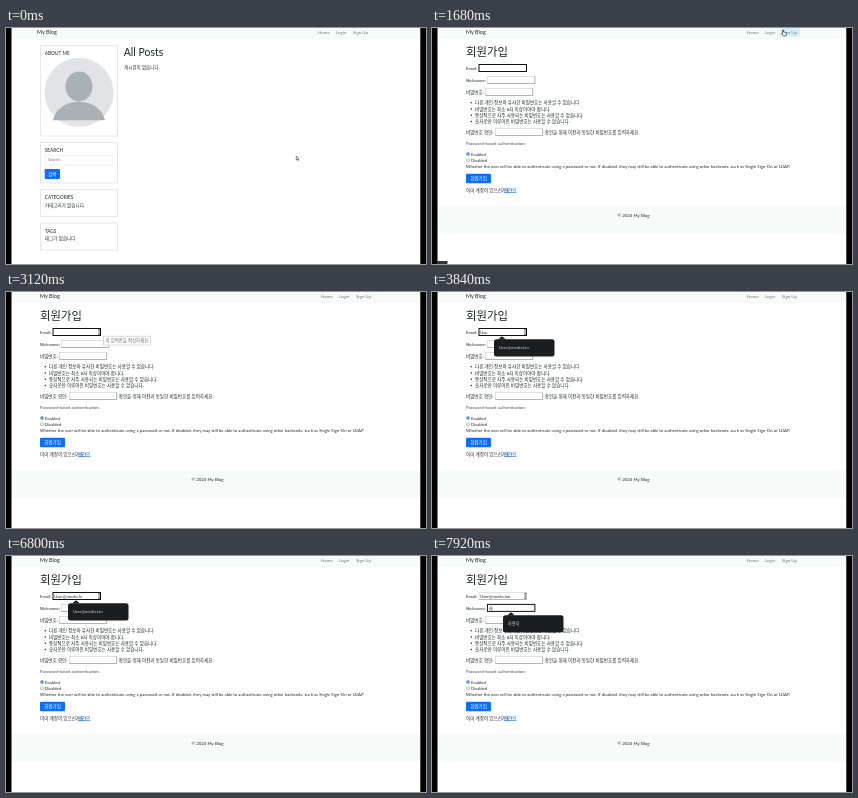
Recreate the animation shown at these times as an HTML page with a canvas. Size 420 by 236 pixels, loop 8000 ms.

```html
<!DOCTYPE html>
<html>
<head>
<meta charset="utf-8">
<title>Blog sign-up</title>
<style>
  html, body { margin: 0; width: 100%; height: 100%; overflow: hidden; background: #fff; }
  canvas { display: block; width: 420px; height: 236px; }
</style>
</head>
<body>
<canvas id="stage" width="420" height="236"></canvas>
<script>
const ctx = document.getElementById('stage').getContext('2d');
const LOOP = 8000;
const INK = '#212529', BLUE = '#0d6efd', BAR = '#f7faf9';
const KO = 4.55, EN = 4.25;
const EMAIL = 'User@media.lan';
const KEY_TIMES = [3360, 3600, 3840, 4000, 5200, 5440, 5760, 5920, 6080, 6320, 6560, 6720, 6800, 6960];

function rect(x, y, w, h, color) {
  ctx.fillStyle = color;
  ctx.fillRect(x, y, w, h);
}

function frame(x, y, w, h, color, width = 0.6) {
  ctx.strokeStyle = color;
  ctx.lineWidth = width;
  ctx.strokeRect(x, y, w, h);
}

function rounded(x, y, w, h, r, color) {
  ctx.fillStyle = color;
  ctx.beginPath();
  ctx.roundRect(x, y, w, h, r);
  ctx.fill();
}

function ellipse(x, y, rx, ry, color) {
  ctx.fillStyle = color;
  ctx.beginPath();
  ctx.ellipse(x, y, rx, ry, 0, 0, 7);
  ctx.fill();
}

// Laid out at ten times the size so that small glyphs keep exact spacing.
function text(str, x, y, size = KO, color = INK, align = 'left') {
  ctx.save();
  ctx.translate(x, y);
  ctx.scale(0.1, 0.1);
  ctx.font = `${size * 10}px Lato, "Noto Sans CJK KR", "Noto Sans CJK", sans-serif`;
  ctx.textAlign = align;
  ctx.fillStyle = color;
  ctx.fillText(str, 0, 0);
  ctx.restore();
}

function shape(points, x, y, fill, stroke) {
  ctx.beginPath();
  points.forEach(([px, py]) => ctx.lineTo(x + px, y + py));
  ctx.closePath();
  ctx.fillStyle = fill;
  ctx.fill();
  if (!stroke) return;
  ctx.strokeStyle = stroke;
  ctx.lineWidth = 0.6;
  ctx.stroke();
}

const arrow = (x, y) =>
  shape([[0, 0], [0, 4], [1, 3.2], [1.7, 4.6], [2.3, 4.3], [1.7, 3], [2.9, 2.9]], x, y, '#fff', '#333');

const hand = (x, y) =>
  shape([[0, 0], [1, 0], [1.1, 2], [3.9, 2.6], [3.7, 4.6], [3, 6], [1, 6], [-1, 3.5], [-0.4, 3], [0, 3.4]], x, y, '#fff', '#222');

function beam(x, y) {
  rect(x - 0.3, y - 2.5, 0.7, 5, '#333');
  rect(x - 1, y - 2.7, 2, 0.5, '#333');
  rect(x - 1, y + 2.2, 2, 0.5, '#333');
}

function nav(shift, hovered) {
  rect(5, 0, 410, 11, BAR);
  if (hovered) rounded(345 + shift, -1, 20, 10, 1, '#d9ecf8');
  text('My Blog', 31 + shift, 5.9, 5.4);
  text('Home', 312 + shift, 5.5, 4.4, '#70757a');
  text('Login', 330 + shift, 5.5, 4.4, '#70757a');
  text('Sign Up', 347 + shift, 5.5, 4.4, hovered ? '#4b8fc4' : '#70757a');
}

function card(y, h, title) {
  frame(34.5, y + 0.5, 77, h, '#dfe1e3', 0.8);
  text(title, 38.7, y + 10, 4.8);
}

function homePage(hovered) {
  nav(0, hovered);
  text('All Posts', 117.7, 28.2, 10.5);
  text('게시글이 없습니다.', 118, 40.8);

  card(17, 90.5, 'ABOUT ME');
  ellipse(73, 64.3, 34.5, 34.5, '#e1e3e6');
  ellipse(73, 58.5, 13.5, 15, '#abb0b4');
  ctx.beginPath();
  ctx.moveTo(47, 92.3);
  ctx.bezierCurveTo(52, 67.5, 94, 67.5, 99, 92.3);
  ctx.fill();

  card(114, 40.5, 'SEARCH');
  frame(39, 127.3, 68, 9.6, '#e3e6e8', 0.6);
  text('Search...', 42, 133.2, 4, '#777');
  rounded(38.7, 141, 15.3, 10, 1.2, BLUE);
  text('검색', 46.3, 147.5, 4.4, '#fff', 'center');

  card(161, 27, 'CATEGORIES');
  text('카테고리가 없습니다.', 39, 178.6);
  card(194.5, 27, 'TAGS');
  text('태그가 없습니다.', 39, 212.4);
}

function input(x, y, focused) {
  if (focused) {
    frame(x, y, 47.5, 7, '#111', 1);
  } else {
    frame(x, y, 47.5, 7, '#c4c4c4', 0.5);
    rect(x, y + 6.8, 47.5, 0.5, '#8a8a8a');
    rect(x + 47.3, y, 0.5, 7.2, '#8a8a8a');
  }
}

function radio(y, label, checked) {
  ellipse(36, y, 1.7, 1.7, checked ? BLUE : '#777');
  ellipse(36, y, 1.25, 1.25, '#fff');
  if (checked) ellipse(36, y, 0.95, 0.95, BLUE);
  text(label, 39, y + 1.5, EN);
}

function suggestion(x, y, label) {
  shape([[0, 3.2], [4, 0], [8, 3.2]], x + 4, y - 3, '#1c1d1e');
  rounded(x, y, 60.5, 17.2, 2.5, '#1c1d1e');
  text(label, x + 4.8, y + 10, EN, '#d2d4d6');
}

function formPage(t) {
  const onNickname = t >= 7120;
  nav(3, t < 1840);
  text('회원가입', 34, 27.8, 11.4);

  text('Email:', 34, 41.6, EN);
  input(47, 36.5, !onNickname);
  text(EMAIL.slice(0, KEY_TIMES.filter(k => t >= k).length), 48.2, 41.5, EN);

  text('Nickname:', 34, 53.5, EN);
  input(55.4, 48.4, onNickname);
  if (t >= 7760) text(t < 7840 ? 'ㅅ' : '사', 56.8, 53.5, KO);

  text('비밀번호:', 34, 65.6);
  input(53.3, 60.5);
  [
    '다른 개인 정보와 유사한 비밀번호는 사용할 수 없습니다.',
    '비밀번호는 최소 8자 이상이어야 합니다.',
    '통상적으로 자주 사용되는 비밀번호는 사용할 수 없습니다.',
    '숫자로만 이루어진 비밀번호는 사용할 수 없습니다.'
  ].forEach((rule, i) => {
    const y = 76.3 + i * 6.25;
    ellipse(39.3, y - 1.5, 0.75, 0.75, INK);
    text(rule, 43, y);
  });

  text('비밀번호 확인:', 34, 105.8);
  input(63.3, 100.5);
  text('확인을 위해 이전과 동일한 비밀번호를 입력하세요.', 112.7, 105.8);

  text('Password-based authentication:', 34, 117, EN, '#44484c');
  radio(126, 'Enabled', true);
  radio(132.2, 'Disabled', false);
  text('Whether the user will be able to authenticate using a password or not. If disabled, they may still be able to authenticate using other backends, such as Single Sign-On or LDAP.', 34, 140, EN);

  rounded(34, 145.7, 25, 9.5, 1.2, BLUE);
  text('회원가입', 46.5, 152.1, KO, '#fff', 'center');
  text('이미 계정이 있으신가요?', 34, 164);
  text('로그인', 72, 164, KO, BLUE);
  rect(72, 164.5, 12.6, 0.45, BLUE);

  rect(5, 178, 410, 28.3, BAR);
  text('© 2024 My Blog', 201.5, 188.8, 4.4, INK, 'center');

  if (t >= 3120 && t < 3200) {
    rect(97.5, 44.2, 47, 8.8, '#fff');
    frame(97.5, 44.2, 47, 8.8, '#c5c5c5', 0.6);
    text('이 입력란을 작성하세요.', 99.5, 50.1, 4.4, '#666');
  }
  if (t >= 3440 && t < 7040) suggestion(62, 47.2, EMAIL);
  if (t >= 7840) suggestion(71, 59.2, '사용자');
}

// Eased position between two points over a span of time.
function travel(t, start, end, [x0, y0], [x1, y1]) {
  const p = Math.min(1, Math.max(0, (t - start) / (end - start)));
  const e = p * p * (3 - 2 * p);
  return [x0 + (x1 - x0) * e, y0 + (y1 - y0) * e];
}

function pointer(t) {
  if (t < 1120) arrow(...travel(t, 680, 1160, [290.3, 128], [349, 3]));
  else if (t < 1840) hand(...travel(t, 1120, 1360, [349, 2], [350.5, 2]));
  else if (t < 2400) arrow(...travel(t, 1760, 2320, [350.5, 2], [81, 44]));
  else beam(...travel(t, 2320, 2560, [81, 45], [93, 40]));
}

function draw(t) {
  rect(0, 0, 420, 236, '#fff');
  if (t < 1520) homePage(t >= 1120);
  else formPage(t);
  rect(0, 0, 5.5, 236, '#000');
  rect(414.3, 0, 5.7, 236, '#000');
  if (t >= 1520 && t < 1840) rect(5, 233, 10.5, 3, '#34373a');
  pointer(t);
}

const began = performance.now();
function tick() {
  draw((performance.now() - began) % LOOP);
  requestAnimationFrame(tick);
}
tick();
</script>
</body>
</html>
```
